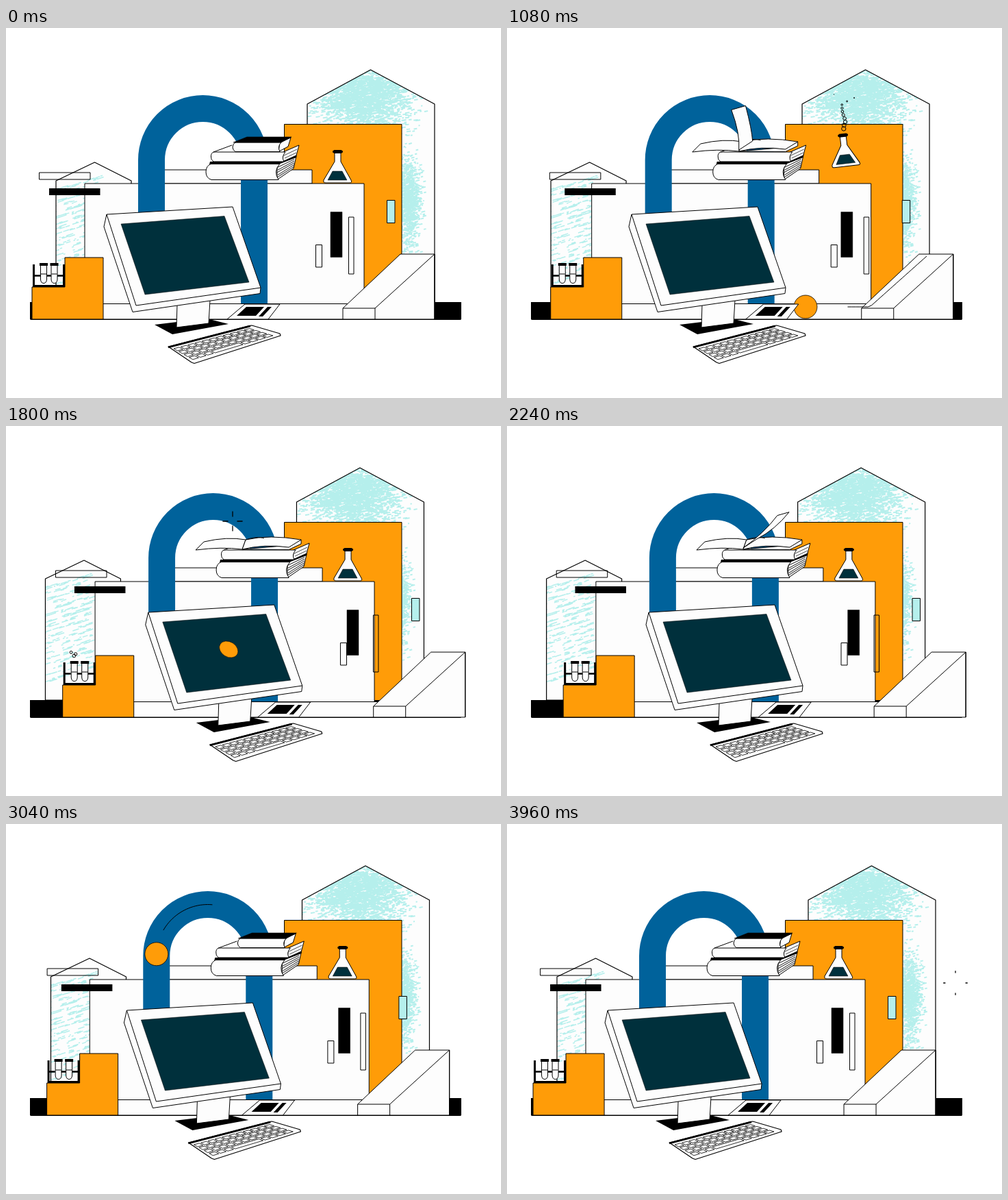
Animation of 723x540 px, one loop 4 s. Source, as an HTML page with a canvas:

```html
<!DOCTYPE html>
<html lang="en">
<head>
<meta charset="utf-8">
<title>Learning machine</title>
<style>
html, body { margin: 0; width: 100%; height: 100%; overflow: hidden; background: #fff; }
canvas { display: block; width: 723px; height: 540px; }
</style>
</head>
<body>
<canvas id="stage" width="723" height="540"></canvas>
<script>
const LOOP = 4000, STEP = 40;
const WHITE = '#fdfdfd', BLACK = '#000', ORANGE = '#ff9c08', BLUE = '#00629b',
      NAVY = '#00303c', AQUA = '#b5efec';
const c = document.getElementById('stage').getContext('2d');

const clamp = (v, a = 0, b = 1) => Math.min(b, Math.max(a, v));
const smooth = u => u * u * (3 - 2 * u);
const ramp = (t, start, length) => smooth(clamp((t - start) / length));

function randomFrom(seed) {
  return () => (seed = (seed * 16807) % 2147483647) / 2147483647;
}

function paint(path, fill, line = 1) {
  if (fill) { c.fillStyle = fill; c.fill(path); }
  if (line) { c.strokeStyle = BLACK; c.lineWidth = line; c.stroke(path); }
}
const shape = (d, fill, line) => paint(new Path2D(d), fill, line);
const poly = (points, fill, line) => shape('M' + points + 'Z', fill, line);
const box = (x, y, w, h, fill, line) => poly(`${x} ${y}h${w}v${h}h${-w}`, fill, line);

function disc(x, y, r, fill, line) {
  const p = new Path2D();
  p.arc(x, y, r, 0, 7);
  paint(p, fill, line);
}

function shifted(dx, draw) {
  c.save();
  c.translate(dx, 0);
  draw();
  c.restore();
}

// Chalk textures
function chalk(count, seed, place) {
  const rnd = randomFrom(seed), path = new Path2D();
  const bell = () => rnd() + rnd() + rnd() + rnd() - 2;
  for (let i = 0; i < count; i++) {
    const [x, y, w, slope] = place(rnd, bell);
    path.moveTo(x, y);
    path.lineTo(x + w, y + w * slope);
  }
  return path;
}
const roofChalk = chalk(2600, 71, (rnd, bell) =>
  [520 + 58 * bell(), 99 + 42 * bell(), 2 + 5 * rnd(), -0.15]);
const wallChalk = chalk(1300, 19, (rnd, bell) =>
  [587 + 15 * bell(), 254 + 52 * bell(), 1 + 4 * rnd(), -0.25]);
const hatchChalk = chalk(330, 43, rnd => {
  const x = 70 + 68 * rnd(), row = Math.floor(rnd() * 18);
  return [x, 236 + row * 8 - (x - 70) * 0.3 + 4 * rnd(), 2 + 8 * rnd(), -0.32];
});

function chalked(outline, textures, width) {
  const p = new Path2D(outline);
  paint(p, WHITE, 0);
  c.save();
  c.clip(p);
  c.strokeStyle = AQUA;
  c.lineWidth = width;
  textures.forEach(texture => c.stroke(texture));
  c.restore();
  paint(p, null, 1.2);
}

// Ball routes
const flight = {
  from: 280, to: 480,
  at(t) {
    const x = 682 - 0.82 * (t - 280);
    return [x, 139 + 0.00172 * (x - 420) ** 2];
  }
};
const roll = {
  from: 830, to: 1237,
  at(t) {
    const s = 0.82 * (t - 830), u = s / 111;
    return u < 1 ? [613 - 83 * u, 333 + 74 * u] : [530 - (s - 111), 407];
  }
};
const loopRide = {
  from: 2340, to: 3211,
  at(t) {
    const s = 0.487 * (t - 2340) - 108, arc = 75 * Math.PI;
    if (s < 0) return [362.5, 192.5 - s];
    if (s > arc) return [212.5, 192.5 + s - arc];
    return [287.5 + 75 * Math.cos(s / 75), 192.5 - 75 * Math.sin(s / 75)];
  }
};

function ride(route, t) {
  const start = clamp(t - 250, route.from, route.to);
  const end = clamp(t - 75, route.from, route.to);
  if (end > start) {
    const p = new Path2D();
    for (let i = 0; i <= 24; i++) p.lineTo(...route.at(start + (end - start) * i / 24));
    paint(p);
  }
  if (t >= route.from && t <= route.to) disc(...route.at(t), 17, ORANGE, 0.8);
}

function sparkle(x, y, t, start) {
  const a = (t - start) / 400;
  if (a <= 0 || a >= 1) return;
  const inner = 18 * a * a, outer = 18 * Math.sin(a * Math.PI / 2);
  const p = new Path2D();
  for (const [i, j] of [[1, 0], [-1, 0], [0, 1], [0, -1]]) {
    p.moveTo(x + i * inner, y + j * inner);
    p.lineTo(x + i * outer, y + j * outer);
  }
  paint(p, null, 1.3);
}

function bubbles(x, y, t, { start, count, gap, rise, spread, size }) {
  const rnd = randomFrom(97531);
  rnd();
  for (let i = 0; i < count; i++) {
    const side = rnd() - 0.5, u = (t - start - i * gap) / 560;
    if (u <= 0 || u >= 1) continue;
    disc(x + side * (4 + spread * u), y - rise * u, size * (1 - u) ** 0.8, null, 1);
  }
}

// Scenery
function tallHouse() {
  chalked('M440 425V111L532.5 61L626 111V425Z', [roofChalk, wallChalk], 1.9);
}

function smallHouse() {
  chalked('M73 400V223L129.5 196L183 223V400Z', [hatchChalk], 1.5);
}

function hall() {
  box(220, 207, 227, 20, WHITE);
  box(115, 402.5, 425, 22.5, WHITE);
  box(115, 227, 408, 175.5, WHITE);
}

function arch() {
  c.strokeStyle = BLUE;
  c.lineWidth = 39;
  c.stroke(new Path2D('M212.5 273V192.5A75 75 0 0 1 362.5 192.5V402'));
}

function flask(t) {
  const lift = ramp(t, 320, 280) - ramp(t, 1240, 280);
  const tilt = 8 * Math.sin((t - 560) / 800 * 2 * Math.PI) * lift;
  bubbles(485, 151, t, { start: 540, count: 11, gap: 50, rise: 56, spread: 30, size: 3.3 });
  c.save();
  c.translate(484, 203 - 24 * lift);
  c.rotate(tilt * Math.PI / 180);
  c.translate(-484, -203);
  shape('M480 182V195L464 222Q463 226 467 226H502Q506 226 504 222L489 195V182Z', WHITE);
  poly('477 209 491 209 498 222 470 222', NAVY, 0.5);
  shape('M479 180.5H490', null, 5);
  disc(479, 180.5, 2, BLACK, 0);
  disc(490, 180.5, 2, BLACK, 0);
  c.restore();
}

// One page standing on the book's spine, 0 = flat right, 180 = flat left
function flap(angle) {
  const a = angle * Math.PI / 180, len = 58 + 10 * Math.cos(a);
  const x = len * Math.cos(a), y = -len * Math.sin(a);
  const bend = 7 * Math.sin(a), width = Math.sqrt(Math.max(0, Math.sin(a)));
  shape(`M330 178Q${331 + x / 2 + bend} ${174 + y / 2 + bend} ${331 + x} ${174 + y}` +
        `l${21 * width} ${-6 * width}Q${348 + x / 2 + bend} ${168 + y / 2 + bend} 350 165Z`, WHITE);
}

function books(t) {
  // bottom volume
  shape('M396 198L424 187L420 205L396 221.5Z', WHITE);
  for (let i = 1; i < 6; i++)
    shape(`M${397 - i % 2} ${200 + i * 3.6}L421 ${189 + i * 2.6}`, null, 0.9);
  shape('M300 198H400Q390 209 398 221.5H300Q292 219 292 210Q292 201 300 198Z', WHITE);
  poly('298 195 402 195 425 184 424 189 398 199 297 199', BLACK, 0);
  // middle volume
  shape('M405 181L428 171L424 186L404 195Z', WHITE);
  shape('M407 190L424 182M406 186L425 177', null, 0.7);
  shape('M303 181H408Q402 188 406 195H303Q299 192 299.5 188Q299 183 303 181Z', WHITE);
  shape('M303 181L330 171', null, 1);
  // top volume
  if (t < 420 || t >= 2300) {
    shape('M400 167L416 160L412 173L398 180.5Z', WHITE);
    shape('M335 167H402Q396 173 400 180.5H335Q331 178 331 174Q331 169 335 167Z', WHITE);
    poly('332 167 352 159 417 159 402 167', BLACK, 0.6);
    return;
  }
  shape('M330 180L398 180.5L416 172V166L400 174Z', WHITE);
  shape('M262 181L274 169Q308 161 335 166L330 180Q300 176 262 181Z', WHITE);
  shape('M330 180L335 166Q370 158 416 166L398 177Q362 172 330 180Z', WHITE);
  shape('M335 166Q352 160 362 164', null, 0.8);
  if (t > 500 && t < 1520) flap(180 * (t - 500) / 1020);
  if (t < 720) flap(180 * (t - 420) / 300);
  if (t > 2040) flap(180 * (1 - (t - 2040) / 260));
}

function slope() {
  poly('492 409 576 330 626 330 626 425 492 425', WHITE);
  shape('M492 409H539V425M539 409L626 330', null, 1);
  shape('M626 330V425', null, 1.3);
}

function steps(t) {
  poly('38 378 86 378 86 335 142 335 142 425 38 425', ORANGE);
  for (const x of [55, 70.5]) {
    shape(`M${x - 4.5} 346V367Q${x - 4} 372.5 ${x} 372.5Q${x + 4} 372.5 ${x + 4.5} 367V346Z`, WHITE);
    shape(`M${x - 4} 359H${x + 4}`, null, 1);
    box(x - 6, 343, 12, 4, BLACK, 0);
  }
  shape('M40.5 345V378M84.5 345V378M40 376.5H85', null, 3);
  shape('M40 361.5H50M59 361.5H66M75 361.5H85', null, 2.5);
  bubbles(54, 344, t, { start: 1560, count: 3, gap: 45, rise: 32, spread: 8, size: 3 });
}

function tablet() {
  poly('323 425 349 403 400 403 383 425', WHITE);
  poly('337 420 351 407 377 407 365 420', BLACK, 0);
  poly('369 421 382 407 388 407 375 421', BLACK, 0);
}

function monitor(t) {
  poly('217 433 250 429 297 425 325 432 243 447', BLACK, 0);
  poly('250 403 298 397 296 431 249 437', WHITE);
  poly('147 272 331 261 372 379 371 387.5 185 414.5 143 290', WHITE);
  shape('M147 272L190 405L372 379', null, 1);
  poly('168 286 319 274.5 355 371 203 389', NAVY, 0.5);
  const size = ramp(t, 1480, 160) - ramp(t, 2040, 160);
  if (size > 0) {
    const p = new Path2D();
    p.ellipse(264.5, 326, 14.5 * size, 11 * size, 0.55, 0, 7);
    paint(p, ORANGE, 0.6);
  }
}

function keyboard() {
  shape('M237 465L355 434.5L359 434L400 446L401 449L275 489.5L271 488Z', WHITE, 1.2);
  shape('M237 466L357 435', null, 2.6);
  const at = (u, v) => {
    const x = 245 + 113 * u, y = 468 - 30 * u;
    return [x + v * (30 + 7 * u), y + v * (17 - 6 * u)];
  };
  const key = (u, v, w, h) =>
    poly([at(u, v), at(u + w, v), at(u + w, v + h), at(u, v + h)].join(' '), WHITE, 0.8);
  for (let row = 0; row < 4; row++)
    for (let col = 0; col < 11; col++)
      if (row < 3 || col < 3 || col > 6) key(col / 11, row / 4, 0.07, 0.18);
  key(3 / 11, 0.75, 0.34, 0.18);
}

function draw(t) {
  const sway = smooth(1 - Math.abs(1 - t / 2000));
  const layer = (depth, part) => shifted(depth * sway, () => part(t));
  c.fillStyle = '#fff';
  c.fillRect(0, 0, 723, 540);
  c.lineJoin = 'round';

  layer(-16, tallHouse);
  layer(-16, smallHouse);
  ride(flight, t);
  box(406.5, 140.5, 171.5, 262, ORANGE);
  box(35, 400, 630, 25.5, BLACK, 0);
  layer(15.5, hall);
  layer(15.5, arch);
  layer(15.5, () => ride(loopRide, t));
  layer(15.5, flask);
  layer(37, () => box(556.5, 251.5, 11.5, 33, AQUA));
  layer(24.7, () => {
    box(474, 268.5, 17, 66, BLACK, 0.5);
    box(48.5, 211, 74.5, 10, null);
  });
  layer(37, () => {
    box(500.5, 276, 7.5, 83, null);
    box(452.5, 316.5, 9, 32.5, null);
  });
  layer(38, () => box(63, 234, 74.5, 10, BLACK, 0));
  layer(15.5, books);
  layer(46, slope);
  layer(46, steps);
  shape('M36 425.5H664', null, 1);
  ride(roll, t);
  layer(46, tablet);
  layer(62.5, monitor);
  layer(62.5, keyboard);

  sparkle(331, 139, t, 1560);
  sparkle(162, 143, t, 3300);
  sparkle(655, 232, t, 3600);
  if (t >= 3400 && t < 3520) disc(137, 154, 2, BLACK, 0);
}

const begin = performance.now();
function tick() {
  const t = Math.max(0, performance.now() - begin) % LOOP;
  draw(Math.floor(t / STEP) * STEP);
  requestAnimationFrame(tick);
}
tick();
</script>
</body>
</html>
```
